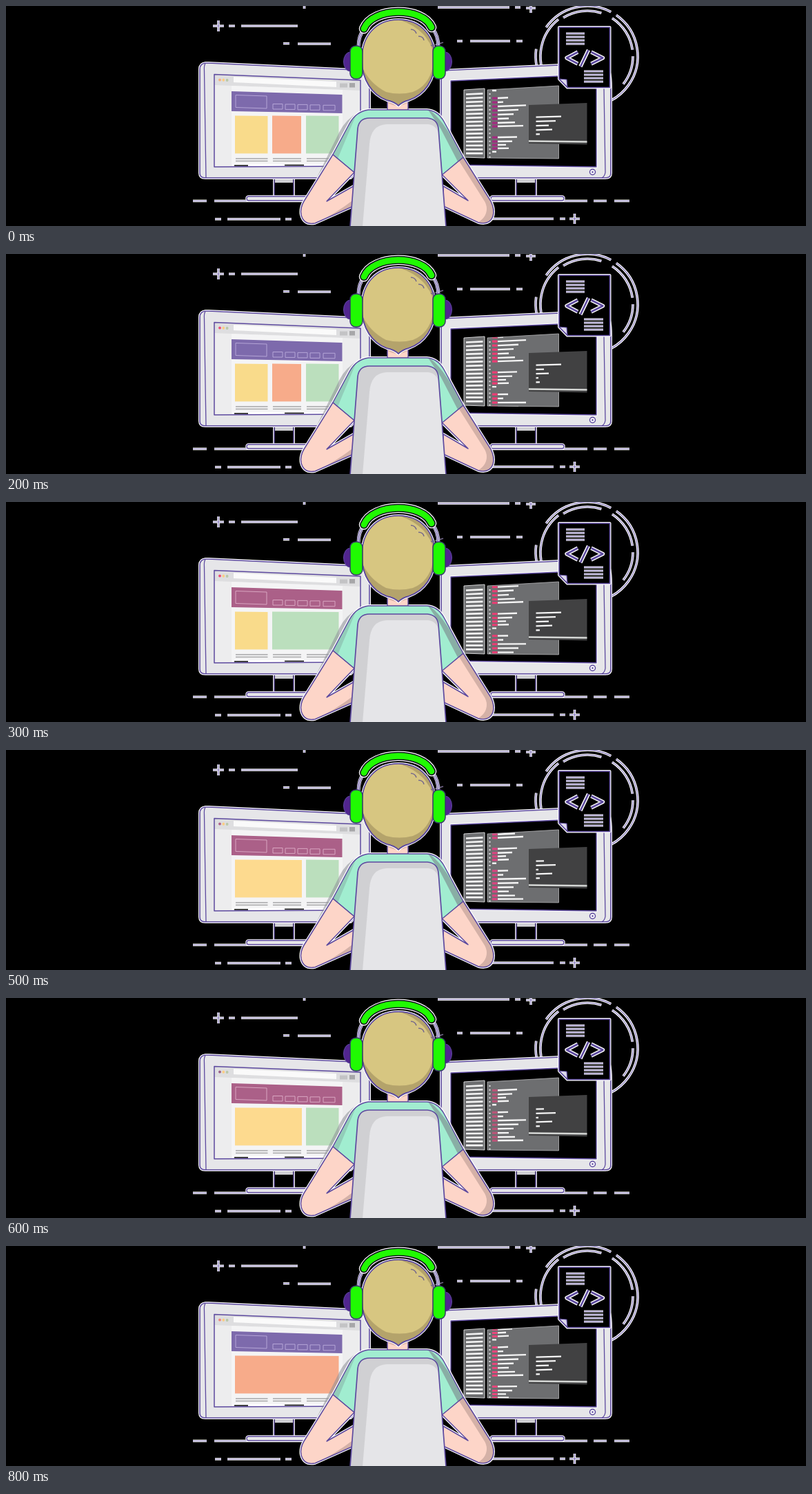
Animation of 1160 by 320 pixels, one loop 0.9 s. Source, as an HTML page with a canvas:

```html
<!DOCTYPE html>
<html lang="en">
<head>
<meta charset="utf-8">
<title>Programmer at two screens</title>
<style>
html, body { margin: 0; width: 100%; height: 100%; overflow: hidden; background: #000; }
canvas { display: block; }
</style>
</head>
<body>
<canvas id="stage" width="1160" height="320"></canvas>
<script>
const ctx = document.getElementById('stage').getContext('2d');
const LOOP = 900, STEP = 100;
const INK = '#5d4a9f', PALE = '#e6e6e9', SKIN = '#fdd5c8', MINT = '#a1edd0';
const HALO = '#fff', GREEN = '#20fa02', RIM = '#35366b';
ctx.lineJoin = 'round';

function paint(path, fill, stroke, width = 1.5) {
  if (fill) { ctx.fillStyle = fill; ctx.fill(path); }
  if (stroke) { ctx.strokeStyle = stroke; ctx.lineWidth = width; ctx.stroke(path); }
}
function shape(d, fill, stroke, width) { paint(new Path2D(d), fill, stroke, width); }
function halo(d, width = 4) { shape(d, null, HALO, width); }
function outlined(d, fill, width = 1.6) {
  halo(d, width + 2.4);
  shape(d, fill, INK, width);
}
function box(x, y, w, h, fill, stroke, width) {
  shape(`M${x} ${y}h${w}v${h}h${-w}z`, fill, stroke, width);
}
function pill(x, y, w, h, r, fill, stroke, width) {
  const p = new Path2D();
  p.roundRect(x, y, w, h, r);
  paint(p, fill, stroke, width);
}
function oval(x, y, rx, ry, fill, stroke, width) {
  const p = new Path2D();
  p.ellipse(x, y, rx, ry, 0, 0, Math.PI * 2);
  paint(p, fill, stroke, width);
}
function clipTo(d, draw) {
  ctx.save();
  ctx.clip(new Path2D(d));
  draw();
  ctx.restore();
}

function drawBackdrop() {
  const strokes = 'M300 29h16M308 21v16M323 29h9M341 29h82M402 54.5h9M423 55h48' +
    'M432.500 0v4M626 2h104M738 2h8M754 3h14M761 0v10M654 51h8M673 51h58M740 51h9' +
    'M271 283.500h20M302 283.500h130M700 283.500h143M852 283.500h19M882 283.500h22' +
    'M303 310h9M321 310h77M405 310h9M700 309.500h94M803 309.500h8M817 309.500h15M824.500 302v15';
  halo(strokes, 3.6);
  shape(strokes, null, '#8376ba', 1.2);

  const ring = (r, from, to) => {
    const p = new Path2D();
    p.arc(843, 73, r, from * Math.PI / 180, to * Math.PI / 180);
    paint(p, null, HALO, 3.6);
    paint(p, null, '#7869b3', 1.1);
  };
  ring(73, -145, -62);
  ring(73, -55, 62);
  ring(75, 169, 188);
  ring(68, 150, 232);
  ring(66, -122, -72);
  ring(66, -57, -8);
  ring(66, 0, 38);
}

function drawStand(x, baseX, baseW) {
  outlined(`M${x} 248h28v30h-28z`, '#000', 1.3);
  box(x + 1, 250, 26, 7, '#cfcfd3');
  pill(baseX, 277, baseW, 6, 3, PALE, HALO, 3.6);
  pill(baseX, 277, baseW, 6, 3, PALE, INK, 1.3);
}

// Card layouts: [left, right, colour]
const YELLOW = '#f9db8b', ORANGE = '#f7ab8a', MILD = '#bbdfbd';
const LAYOUTS = [
  [[332, 379.5, YELLOW], [386, 428, ORANGE], [435, 482.5, MILD]],
  [[332, 379.5, YELLOW], [386, 482.5, MILD]],
  [[332, 429, '#fdda8f'], [435, 482.5, MILD]],
  [[332, 482.5, ORANGE]]
];
const layoutAt = i => i < 3 ? 0 : i < 5 ? 1 : i < 7 ? 2 : 3;
const LAMPS = ['#f8b080', '#ee4c78', '#b0628a', '#9a5f8a', '#f3857f'];

function drawBrowser(i) {
  const layout = layoutAt(i);
  outlined('M289 83Q281 84 281 92V243Q281 250 289 250H500L527 220V94L294 83Z', PALE);
  shape('M289 84Q287 86 287.500 94L290 250', null, INK, 1.3);
  const screen = 'M302 99.500L514 108V233L302 234Z';
  clipTo(screen, () => {
    box(300, 95, 220, 142, '#ededee');
    shape('M302 99L514 108V123L302 115Z', '#dedee0');
    shape('M330 103L479 110V118L330 111Z', '#fafafa');
    shape('M327 116L488 122V231L327 232Z', '#f4f4f5');
    [LAMPS[i >> 1], '#fbcd85', '#b9c9a9'].forEach((c, k) =>
      oval(310 + k * 5.3, 107.5 + k * .2, 1.9, 2.1, c));
    box(484, 112.5, 11, 6, '#c3c3c5');
    box(498, 112, 8, 6.5, '#a7a7a9');
    const pink = layout === 1 || layout === 2;
    shape('M327 124L487.500 129V156L327 153Z', pink ? '#ab6088' : '#7d6aac');
    const rim = pink ? '#d9a6c1' : '#b5a5d7';
    shape('M333 129.500L378 131V149L333 147.500Z', null, rim, 1);
    [387, 405, 423, 441, 460].forEach((x, k) =>
      box(x, 142.5 + k * .45, k < 4 ? 14 : 17, 7.5, null, rim, 1));
    for (const [a, b, c] of LAYOUTS[layout])
      shape(`M${a} 159.500L${b} 160V214.500H${a}Z`, c);
    for (const [a, b] of LAYOUTS[0])
      for (const y of [222, 225.5]) box(a + 1, y - .8, b - a - 1, 1.6, '#a6a6a8');
    box(328, 230, 152, 3, '#fff');
  });
  shape(screen, null, INK, 1.5);
  shape('M331 232h20M404 231.500h28', null, '#000', 1.5);
}

// Code listing: [offset, right end] repeating every CYCLE pixels
const CYCLE = 89;
const CODE = [[0, 741], [6, 734], [11, 725], [16, 729], [21, 711], [32, 728], [38, 721],
  [44, 754], [50, 743], [56, 736], [62, 729], [68, 738], [73, 750]];
const MARKS = ['#a32a80', '#ec3c74', '#d94480', '#b85578', '#e8467c'];

function drawCode(i) {
  const page = 'M698 122L801.500 116V222L698 221Z';
  shape(page, '#6d6e70', '#b9b9bb', .8);
  clipTo(page, () => {
    for (let y = 128; y < 221; y += 5.73) box(700.5, y - 1, 2, 2, '#e5e5e5');
    for (const [offset, end] of CODE) {
      for (let y = 191 + offset - i * 9.45 - CYCLE * 2; y < 223; y += CYCLE) {
        if (y < 119) continue;
        const tilt = (222 - y) * .0005;
        if (end < 715) { box(705, y - 1.2, 6, 2.4, '#f2f2f2'); continue; }
        box(705, y - 1.5, 7.5, 3.2, MARKS[i >> 1]);
        const rise = (end - 712) * tilt;
        shape(`M713 ${y}L${end} ${y - rise}`, null, '#f5f5f5', 2.4);
      }
    }
  });
}

function terminalWidths(i) {
  if (i === 1 || i === 2) return [37, 12, 19, 4, 6];
  if (i >= 5 && i <= 7) return [12, 29, 4, 24, 6];
  return [37, 29, 19, 24, 6];
}

function drawEditor(i) {
  outlined('M631 94L802 86H869Q877 90 877 119V243Q877 250 869 250H670L631 200Z', PALE);
  shape('M867 119L869 242Q868 248 864 250', null, INK, 1.3);
  outlined('M645 109L802 102H856V234L645 231Z', '#000', 1.3);
  oval(850.5, 241.5, 4, 4, '#fff', INK, 1.5);
  oval(850.5, 241.5, 1.3, 1.3, INK);

  shape('M664 122L694 120V221L664 220Z', '#6d6e70', '#d5d5d7', 1);
  for (let y = 128.5; y < 217; y += 5.73)
    shape(`M667 ${y}L691.500 ${y - (220 - y) * .012}`, null, '#f1f1f1', 2.7);
  drawCode(i);

  shape('M758 144L842.500 141V201.500L758 200Z', '#414142');
  shape('M758 196.500L842.500 197.500', null, '#d5d7d5', 2.5);
  terminalWidths(i).forEach((w, k) => {
    const y = 161.7 + k * 6.2;
    shape(`M768.500 ${y}L${768 + w} ${y - w * .03}`, null, '#f4f4f4', 2.3);
  });
}

function drawDocument() {
  outlined('M802 31H875.500V118.500H814L802 106Z', '#000', 1.6);
  shape('M802 106L813 107L814 118Z', '#dedaed', INK, 1.2);
  let rows = '';
  for (let k = 0; k < 4; k++) {
    rows += `M812 ${40 + k * 5}h27M838 ${95 + k * 5}h28`;
  }
  halo(rows, 3.2);
  shape(rows, null, '#7667b1', 1.1);
  const tag = 'M829 67L813 75.500L829 84M844.500 64L833 88M848.500 67L865.500 75.500L848.500 84';
  halo(tag, 5.4);
  shape(tag, null, INK, 2.6);
}

function drawBody() {
  ctx.globalAlpha = .55;
  shape('M512 154Q492 165 483 184L451 249H465L480 224L500 172Z', '#8f9098');
  ctx.globalAlpha = 1;

  const leftArm = 'M474 216L432 284Q426 294 428 304Q432 319 448 316L504 291V262L465 284L505 242Z';
  const rightArm = 'M663 220L703 284Q709 296 706 306Q701 319 685 315L634 291V262L670 283L632 245Z';
  const shirt = 'M526 151H610Q626 152 635 168L663 220L633 245L600 220H535L505 242L474 216L498 171Q508 153 526 151Z';
  const chair = 'M499 321L510 178Q512 163 527 163H611Q625 164 627 178L638 321Z';

  [leftArm, rightArm, shirt].forEach(part => halo(part));
  shape(leftArm, SKIN);
  shape(rightArm, SKIN);
  clipTo(leftArm, () => shape('M442 319Q474 305 505 281V320Z', '#d4b1a7'));
  clipTo(rightArm, () =>
    shape('M663 220L710 284V320H674Q697 311 697 295Q697 288 692 281L656 224Z', '#d4b1a7'));
  shape(leftArm, null, INK, 1.5);
  shape(rightArm, null, INK, 1.5);

  box(553, 134, 30, 22, SKIN, INK, 1.4);
  shape('M554 137H582V141Q568 149 554 141Z', '#dcb4a8');
  shape(shirt, MINT);
  clipTo(shirt, () => {
    shape('M612 151Q630 158 663 220L656 228L630 178Z', '#89aea5');
    shape('M498 168L474 216L481 222L507 160Z', '#92cdb9');
  });
  shape(shirt, null, INK, 1.5);

  shape(chair, '#d0d0d3');
  clipTo(chair, () =>
    shape('M517 321L527 201Q529 173 552 172H612Q625 173 629 190L640 321Z', '#e5e5e8'));
  shape(chair, null, INK, 1.7);
}

function drawHead() {
  const hair = 'M569 20C535 20 516 45 516 78C516 108 531 129 552 137Q563 139 569 145Q575 139 584 137C607 129 622 108 622 78C622 45 603 20 569 20Z';
  outlined(hair, '#b4a36b', 1.6);
  clipTo(hair, () => {
    shape('M515 86V20H570Q592 27 606 42Q624 62 619 88Q613 116 590 125Q570 130 551 125Q526 112 515 86Z', '#d7c681');
    shape('M586 22Q612 32 622 56L613 52Q603 34 586 22Z', '#b4a36b');
  });
  shape(hair, null, INK, 1.5);
  shape('M587 34Q593 34 595 40M598 44Q605 44 606 50M616 57Q622 59 623 63M617 58L634 53', null, '#75688c', 1.5);

  const arms = 'M511 60Q511 43 519 34M627 60Q627 43 618 32';
  halo(arms, 5);
  shape(arms, null, INK, 3.5);
  shape(arms, null, '#d9d6e4', 1.5);
  const band = 'M519 33C532 1 604 1 617 31';
  ctx.lineCap = 'round';
  halo(band, 14.5);
  shape(band, null, '#12101f', 12);
  shape(band, null, GREEN, 8.8);
  ctx.lineCap = 'butt';

  for (const [pad, cup] of [[499, 499], [637, 619]]) {
    oval(pad, 81, 9.5, 14, '#51258f', INK, 1);
    pill(cup, 58, 18, 48, 8, GREEN, RIM, 1.5);
  }
}

function render(now) {
  const i = Math.floor((now % LOOP) / STEP);
  ctx.fillStyle = '#000';
  ctx.fillRect(0, 0, 1160, 320);
  drawBackdrop();
  drawStand(389, 349, 110);
  drawStand(740, 703, 106);
  drawBrowser(i);
  drawEditor(i);
  drawDocument();
  drawBody();
  drawHead();
}

const start = performance.now();
function tick() {
  render(performance.now() - start);
  requestAnimationFrame(tick);
}
tick();
</script>
</body>
</html>
```
